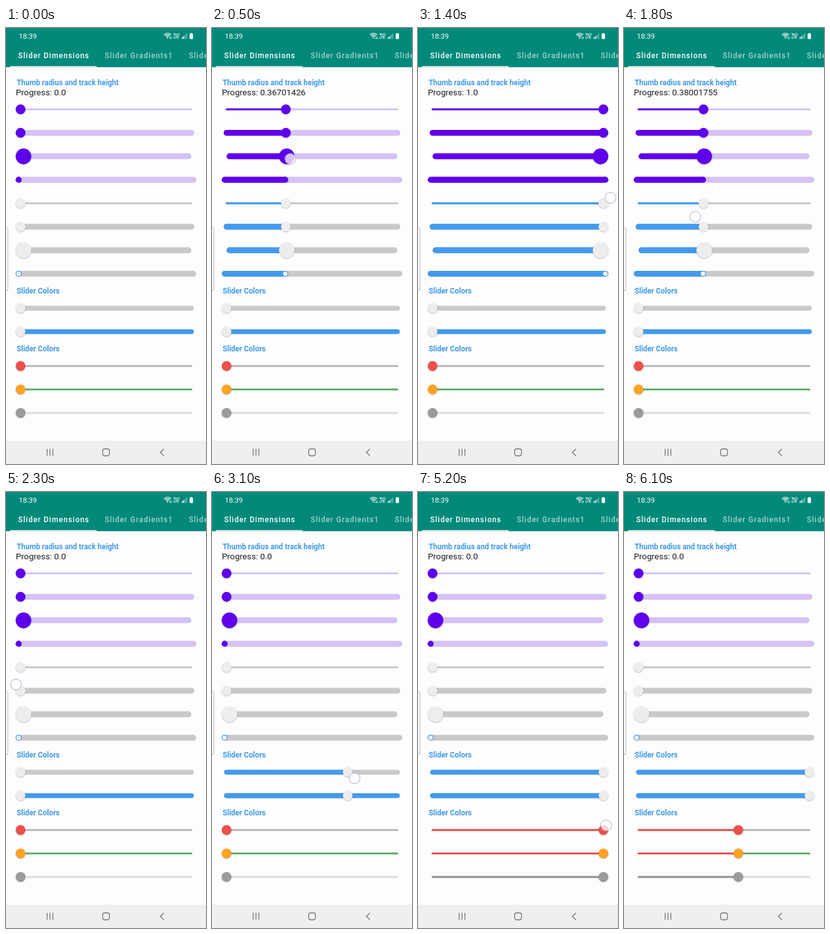
Write an HTML page with a canvas that moves like this. It is 320 px wide and 693 px high and loops after 6.3 s.

```html
<!DOCTYPE html>
<html lang="en">
<head>
<meta charset="utf-8">
<title>Slider dimensions</title>
<style>
  html, body { margin: 0; width: 100%; height: 100%; overflow: hidden; background: #fdfdfd; }
  canvas, svg { position: absolute; left: 0; top: 0; width: 320px; height: 693px; }
  text { font-family: Roboto, sans-serif; white-space: pre; }
  .tab { font-size: 11.85px; font-weight: 500; letter-spacing: 1.06px; fill: #fff; }
  .off { fill: #a3d4ce; }
  .head { font-size: 11.9px; font-weight: 700; fill: #419be9; }
  .tiny { font-size: 5.2px; font-weight: 700; fill: #fff; }
</style>
</head>
<body>
<canvas id="stage"></canvas>
<svg viewBox="0 0 320 693">
  <text x="20.5" y="17.3" font-size="11.6" fill="#fff">18:39</text>
  <text class="tiny" x="268" y="12">Vo))</text>
  <text class="tiny" x="268.3" y="17">LTE</text>
  <text class="tab" x="19.5" y="47.5">Slider Dimensions</text>
  <text class="tab off" x="158" y="47.5">Slider Gradients1</text>
  <text class="tab off" x="292.5" y="47.5">Slider Gradients2</text>
  <text class="head" x="17" y="90.5">Thumb radius and track height</text>
  <text id="label" x="15.7" y="107.4" font-size="13.7" fill="#1c1c1c">Progress: 0.0</text>
  <text class="head" x="17" y="422.3">Slider Colors</text>
  <text class="head" x="17" y="514.2">Slider Colors</text>
</svg>
<script>
const W = 320, H = 693, LOOP = 6300, STEP = 100;
const DP = .7776, ROW = 48 * DP;
const canvas = document.getElementById('stage');
const label = document.getElementById('label');
const c = canvas.getContext('2d');
const dpr = window.devicePixelRatio || 1;
canvas.width = W * dpr;
canvas.height = H * dpr;

const PURPLE = '#5f00ec', LILAC = '#d4c1f6', BLUE = '#449aec', GREY = '#c9c9c9';
const PALE = '#ededed', RED = '#ee5049';

// a look is [track, progress, thumb]; a size is [thumb radius, track height] in dp
const sizes = [[10, 4], [10, 12], [16, 12], [6, 12]];
const repeat = (look, n) => Array(n).fill(look);

const groups = [
  {
    top: 129.3,
    looks: [...repeat([LILAC, PURPLE, PURPLE], 4), ...repeat([GREY, BLUE, PALE], 4)],
    size: i => sizes[i % 4],
    // each key is [time, progress, finger x, finger y]
    keys: [[200, 0, 26, 204], [800, .84435884, 266, 217], [1000, 1, 308, 232],
      [1400, 1, 308, 270], [1800, .38001755, 114, 300], [2100, 0, 16, 306]],
    lift: 2500
  },
  {
    top: 445.3,
    looks: [[GREY, BLUE, PALE], [BLUE, BLUE, PALE]],
    size: () => [10, 10],
    keys: [[2700, 0, 25, 446], [3100, .709, 228, 455], [3500, 1, 306, 456]],
    lift: 3900
  },
  {
    top: 537.2,
    looks: [['#b9b9b9', RED, RED], ['#5fb168', RED, '#ffa321'], ['#dedede', '#979797', '#9b9b9b']],
    size: () => [10, 4],
    keys: [[4200, 0, 28, 538], [4400, .131, 81, 540], [5100, 1, 306, 531],
      [5200, 1, 301, 530], [5700, .584, 181, 534]],
    lift: 5900
  }
];

// smooth curve through column i of the keys that never overshoots
function at(keys, t, i) {
  const last = keys.length - 1;
  if (t <= keys[0][0]) return keys[0][i];
  if (t >= keys[last][0]) return keys[last][i];
  const rate = k => (keys[k + 1][i] - keys[k][i]) / (keys[k + 1][0] - keys[k][0]);
  const slope = k => {
    if (k === 0 || k === last) return 0;
    const a = rate(k - 1), b = rate(k);
    return a * b > 0 ? 2 * a * b / (a + b) : 0;
  };
  const k = keys.findIndex(key => key[0] > t) - 1;
  const span = keys[k + 1][0] - keys[k][0];
  const u = (t - keys[k][0]) / span, v = 1 - u;
  return keys[k][i] * v * v * (1 + 2 * u) + keys[k + 1][i] * u * u * (1 + 2 * v)
    + span * u * v * (slope(k) * v - slope(k + 1) * u);
}

function rect(x, y, w, h, color) {
  c.fillStyle = color;
  c.fillRect(x, y, w, h);
}

function path(points, color, width) {
  c.beginPath();
  points.forEach(p => c.lineTo(p[0], p[1]));
  c.strokeStyle = color;
  c.lineWidth = width;
  c.stroke();
}

function disc(x, y, r, color) {
  c.beginPath();
  c.arc(x, y, r, 0, Math.PI * 2);
  c.fillStyle = color;
  c.fill();
}

function box(x, y, w, h, r) {
  c.beginPath();
  c.roundRect(x, y, w, h, r);
}

function statusIcons() {
  c.lineCap = 'butt';
  c.strokeStyle = '#fff';
  c.lineWidth = 1.1;
  for (let r = 3; r < 8; r += 2.4) {
    c.beginPath();
    c.arc(258.5, 16, r, -Math.PI * .77, -Math.PI * .23);
    c.stroke();
  }
  disc(258.5, 15.8, 1.1, '#fff');
  for (const x of [262.4, 264.4]) path([[x, 14], [x, 17.5]], '#fff', .9);
  for (let i = 0; i < 4; i++)
    rect(281 + i * 2.4, 15 - i * 2.1, 1.5, 2.3 + i * 2.1, i < 2 ? '#fff' : 'rgba(255,255,255,.45)');
  c.fillStyle = '#fff';
  box(293.8, 9, 5.4, 8.6, 1);
  c.fill();
  rect(295.3, 8, 2.4, 1.2, '#fff');
}

function chrome() {
  rect(0, 0, W, H, '#fdfdfd');
  rect(0, 0, W, 62.3, '#02897a');
  rect(6.5, 60.7, 138.5, 1.6, '#fff');
  statusIcons();

  box(-6, 317, 9, 100.5, 3);
  c.fillStyle = '#fbfbfb';
  c.fill();
  c.strokeStyle = '#c3c3c3';
  c.lineWidth = 1.2;
  c.stroke();

  rect(0, 656, W, 37, '#efefef');
  for (let i = -1; i < 2; i++) path([[70.4 + i * 4.6, 669], [70.4 + i * 4.6, 680]], '#747474', 1.3);
  box(154.6, 669, 11, 11, 3.4);
  c.stroke();
  path([[252.6, 669], [247, 674.5], [252.6, 680]], '#747474', 1.3);
}

function slider(p, y, [radius, height], [track, fill, thumb]) {
  const inset = (20 + radius) * DP, r = radius * DP, width = height * DP;
  const x = inset + (W - 2 * inset) * p;
  c.lineCap = 'round';
  path([[inset, y], [W - inset, y]], track, width);
  path([[inset, y], [x, y]], fill, width);
  disc(x, y, width / 2, fill);

  // a thumb no taller than its track sits inside it, flat, with a thin rim
  const raised = r > width / 2;
  c.save();
  if (raised) {
    c.shadowColor = 'rgba(0,0,0,.3)';
    c.shadowBlur = 2 * dpr;
    c.shadowOffsetY = .7 * dpr;
  }
  disc(x, y, raised ? r : r - 1, thumb);
  c.restore();
}

function finger({ keys, lift }, t) {
  if (t < keys[0][0] || t >= lift) return;
  disc(at(keys, t, 2), at(keys, t, 3), 8.7, 'rgba(255,255,255,.75)');
  c.strokeStyle = 'rgba(150,145,190,.6)';
  c.lineWidth = 1.2;
  c.stroke();
}

// the readout runs slightly ahead of the thumb on the way up
function readout(keys, t) {
  const p = at(keys, t, 1);
  const rising = p > 0 && at(keys, t + 1, 1) > p;
  const v = rising ? Math.min(1, p + .02) : p;
  return 'Progress: ' + (v % 1 ? v.toFixed(8).replace(/0+$/, '') : v.toFixed(1));
}

function draw(t) {
  c.setTransform(dpr, 0, 0, dpr, 0, 0);
  chrome();
  for (const g of groups) {
    const p = at(g.keys, t, 1);
    g.looks.forEach((look, i) => slider(p, g.top + i * ROW, g.size(i), look));
  }
  groups.forEach(g => finger(g, t));
  const text = readout(groups[0].keys, t);
  if (label.textContent !== text) label.textContent = text;
}

const start = performance.now();
function tick() {
  const t = (performance.now() - start) % LOOP;
  draw(Math.floor(t / STEP) * STEP);
  requestAnimationFrame(tick);
}
tick();
</script>
</body>
</html>
```
